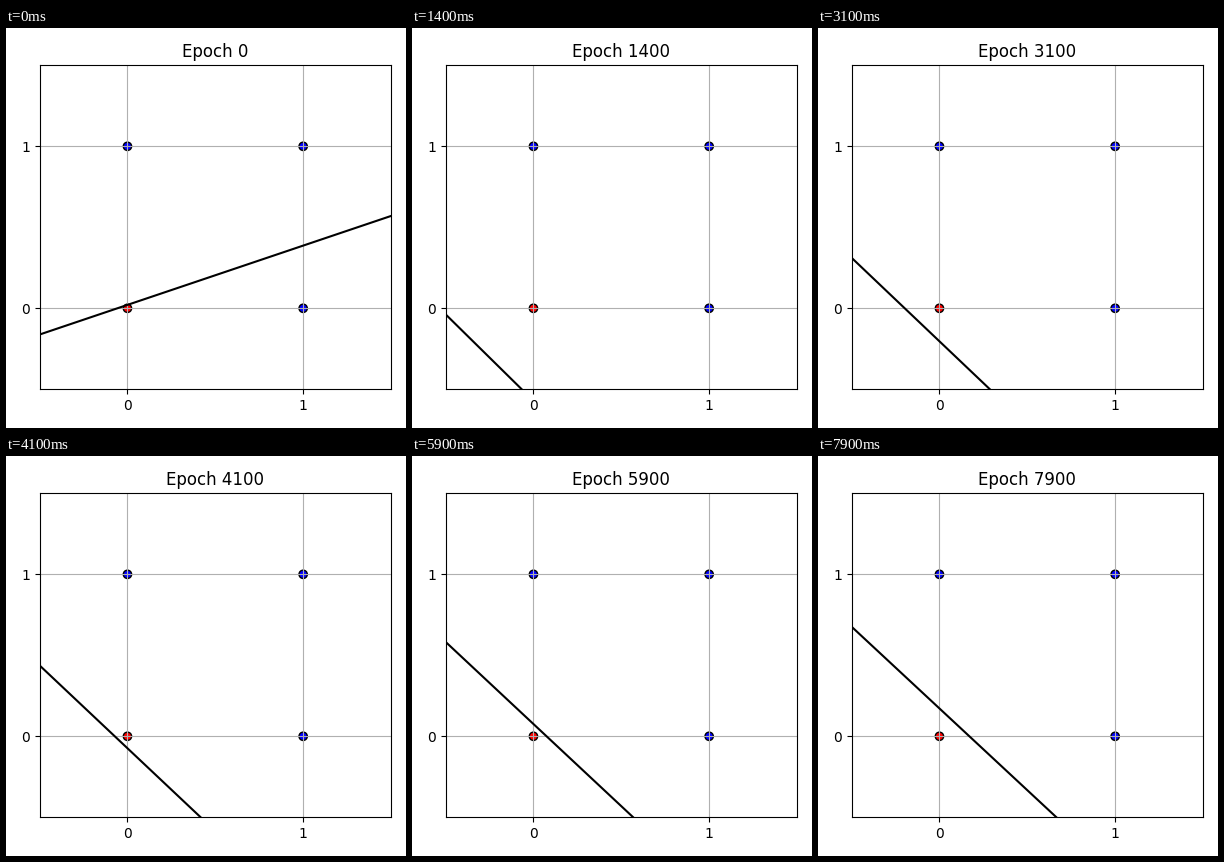
Recreate the animation shown at these times as a matplotlib script. Size 400 px wide and 400 px high, loop 8 s.

```python
import numpy as np
import matplotlib.pyplot as plt
from matplotlib.animation import FuncAnimation

FRAMES, STEP, RATE = 80, 100, 0.001

X = np.array([[0, 0], [0, 1], [1, 0], [1, 1]], dtype=float)
T = np.array([0, 1, 1, 1])  # logical OR


def train():
    """Logistic regression by gradient descent, sampled every STEP epochs."""
    w, b = np.array([0.0183, -0.05]), 0.00105
    history = []
    for epoch in range(FRAMES * STEP):
        if epoch % STEP == 0:
            history.append((w.copy(), b))
        err = T - 1 / (1 + np.exp(-(X @ w + b)))
        w += RATE * (err @ X)
        b += RATE * err.sum()
    return history


history = train()

fig, ax = plt.subplots(figsize=(4, 4), dpi=100)
ax.scatter(X[:, 0], X[:, 1], c=["red" if t == 0 else "blue" for t in T],
           edgecolors="black")
xs = np.array([-0.5, 1.5])
line, = ax.plot([], [], color="black")
title = ax.set_title("Epoch 0")
ax.set(xlim=(-0.5, 1.5), ylim=(-0.5, 1.5), xticks=[0, 1], yticks=[0, 1])
ax.grid(True)
fig.tight_layout()


def update(i):
    (w1, w2), b = history[i]
    line.set_data(xs, -(w1 * xs + b) / w2)
    title.set_text(f"Epoch {i * STEP}")
    return line, title


anim = FuncAnimation(fig, update, frames=FRAMES, interval=100,
                     repeat=True, repeat_delay=0, blit=False)
plt.show()
```
